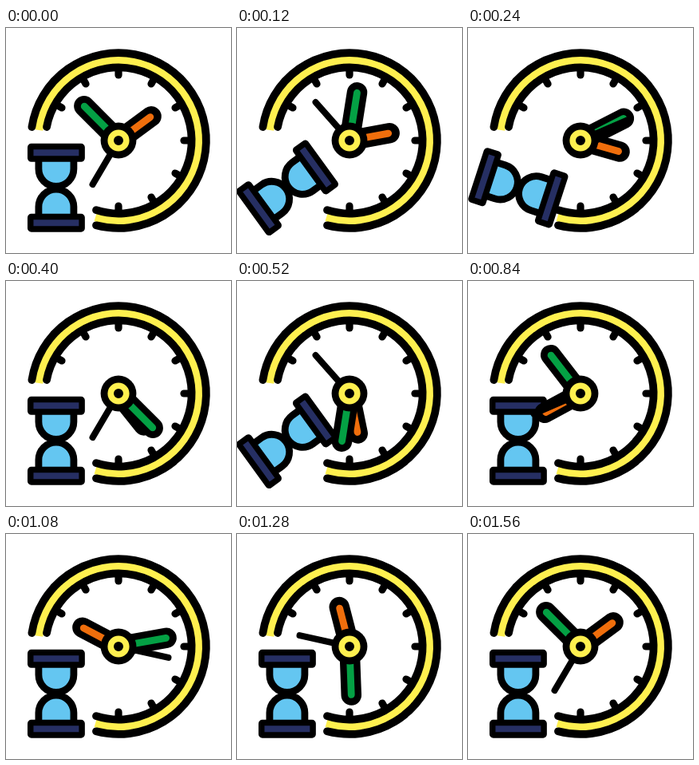
An HTML page that plays this animation: 282 px wide and 282 px high, repeating every 1600 ms.

```html
<!DOCTYPE html>
<html lang="en">
<head>
<meta charset="utf-8">
<title>Clock and hourglass</title>
<style>
  html, body { margin: 0; width: 100%; height: 100%; overflow: hidden; background: #fff; }
  svg { display: block; width: 100vw; height: 100vh; }
  path, line { fill: none; stroke: #000; stroke-linecap: round; }
  .rim { stroke-width: 9.8; }
  .band { stroke: #fff04f; stroke-width: 10; stroke-linecap: butt; }
  .tick { stroke-width: 9.2; }
  .edge { stroke-width: 25.5; }
  .core { stroke-width: 8.8; }
  .bulb { fill: #64c6f1; stroke-width: 8.8; stroke-linecap: butt; }
  .cap { fill: #262f63; stroke: #000; stroke-width: 7.5; stroke-linejoin: round; }
</style>
</head>
<body>
<svg viewBox="0 0 282 282">
  <defs>
    <g id="half">
      <path class="bulb" d="M-22-38V-23.8A22 22 0 0 0 22-23.8V-38"/>
      <rect class="cap" x="-32.2" y="-51.7" width="64.4" height="15.5" rx="1"/>
    </g>
  </defs>

  <path class="band" d="M41.3 128A100.5 100.5 0 1 1 112 237.2"/>
  <path class="rim" d="M32.4 124A109.9 109.9 0 1 1 113 247.3"/>
  <path class="rim" d="M51 124A91.6 91.6 0 1 1 113 228.2"/>

  <g transform="translate(62.9 200.3)">
    <g id="glass">
      <use href="#half"/>
      <use href="#half" transform="rotate(180)"/>
    </g>
  </g>

  <g transform="translate(141 141)">
    <g id="ticks"></g>
    <g id="hour">
      <line class="edge" y2="-51"/>
      <line class="core" y2="-49.5" style="stroke:#ef6e0c"/>
    </g>
    <g id="minute">
      <line class="edge" y2="-61"/>
      <line class="core" y2="-60.5" style="stroke:#04a044"/>
    </g>
    <line id="second" y2="-64" stroke-width="8"/>
    <circle r="22.4"/>
    <circle r="9.8" fill="none" stroke="#fff04f" stroke-width="7.6"/>
  </g>
</svg>
<script>
  const LOOP = 1600, STEP = 40, END = 1560;
  const $ = id => document.getElementById(id);
  const rotate = (id, deg) => $(id).setAttribute('transform', `rotate(${deg})`);

  // Share of a move that runs from time a to time b.
  const part = (t, a, b) => Math.min(1, Math.max(0, (t - a) / (b - a)));

  for (let a = -60; a <= 180; a += 30) {
    $('ticks').insertAdjacentHTML('beforeend',
      `<line class="tick" y1="-90" y2="-82" transform="rotate(${a})"/>`);
  }

  function pose(t) {
    const u = part(t, 0, END);
    rotate('hour', 53.6 + 360 * u * (0.935 + 0.065 * u));
    rotate('minute', 315 + 360 * (part(t, 0, 800) + part(t, 825, END)));
    rotate('second', 210.5 + 360 * (3 * part(t, 0, 1200) + part(t, 1210, END)));
    rotate('glass', 360 * part(t, 0, 800));
  }

  const start = performance.now();
  function draw(now) {
    const t = Math.max(0, now - start) % LOOP;
    pose(Math.floor(t / STEP) * STEP);
    requestAnimationFrame(draw);
  }
  draw(start);
</script>
</body>
</html>
```
